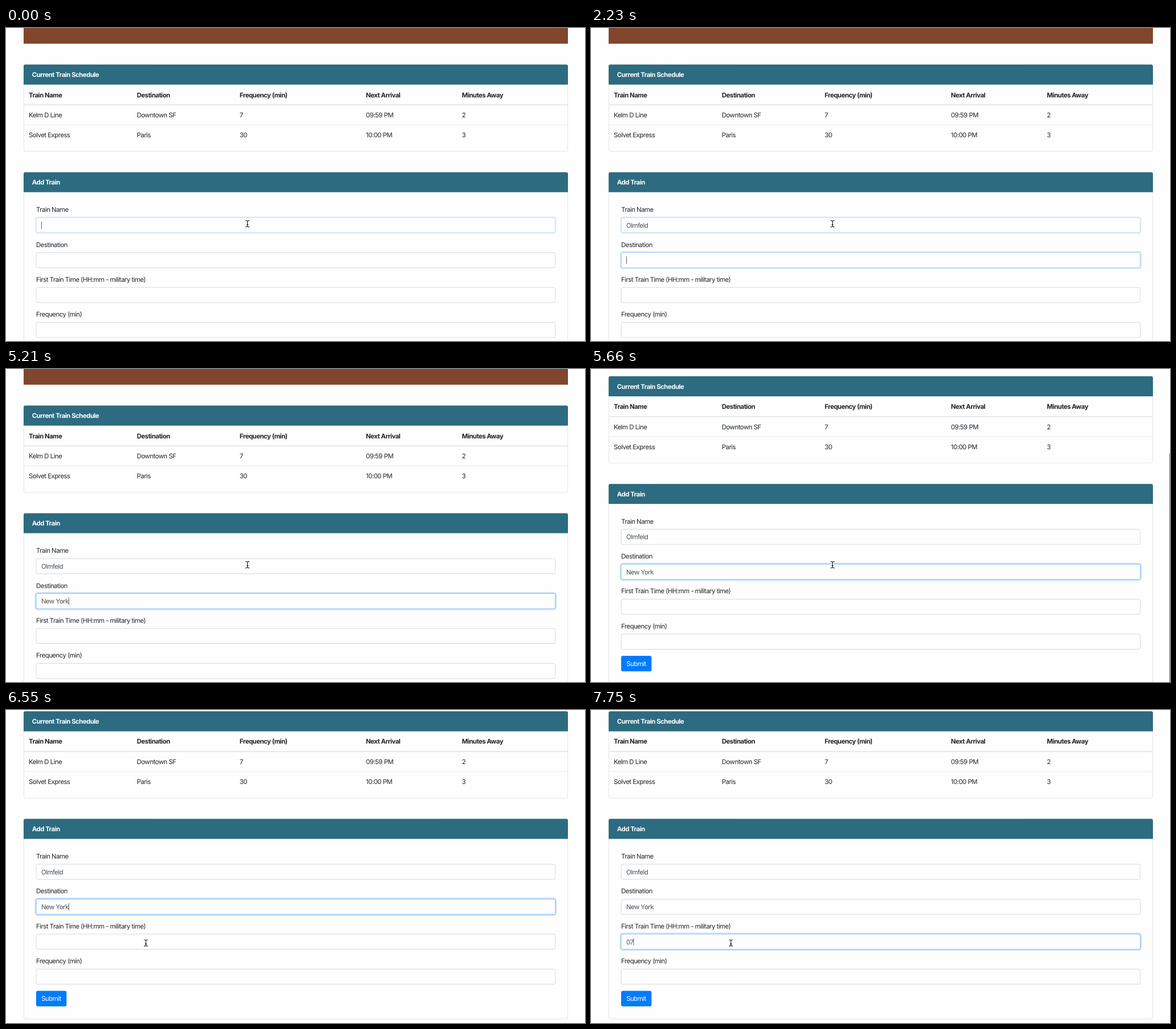
An HTML page that plays this animation: 1018 by 550 pixels, repeating every 8000 ms.

```html
<!DOCTYPE html>
<html lang="en">
<head>
<meta charset="utf-8">
<title>Train schedule</title>
<style>
  html, body { margin: 0; width: 100%; height: 100%; overflow: hidden; background: #fefefe; }
  svg { display: block; width: 1018px; height: 550px; }
  text {
    font: 400 11.43px Inter, "Open Sans", sans-serif;
    letter-spacing: -.51px;
    fill: #212529;
    text-rendering: geometricPrecision;
  }
  .bold { font-weight: 700; }
  .white { fill: #fff; }
  .typed { fill: #495057; }
</style>
</head>
<body>
<svg id="stage" viewBox="0 0 1018 550"></svg>
<script>
const NS = 'http://www.w3.org/2000/svg';
const LOOP = 8000;
const stage = document.getElementById('stage');

function add(parent, tag, attrs, content) {
  const el = document.createElementNS(NS, tag);
  for (const key in attrs) el.setAttribute(key, attrs[key]);
  if (content) el.textContent = content;
  parent.appendChild(el);
  return el;
}
const set = (el, attrs) => { for (const key in attrs) el.setAttribute(key, attrs[key]); };

const page = add(stage, 'g', {});
const box = (x, y, width, height, extra) => add(page, 'rect', { x, y, width, height, ...extra });
const label = (x, y, str, cls = '') => add(page, 'text', { x, y, class: cls }, str);

function card(y, height, title) {
  box(31.35, y + .35, 956.3, height - .7,
    { rx: 2.9, fill: '#fefefe', stroke: '#000', 'stroke-opacity': .14, 'stroke-width': .75 });
  add(page, 'path', {
    d: `M31 ${y + 35.2}V${y + 2.9}q0-2.9 2.9-2.9H985.1q2.9 0 2.9 2.9V${y + 35.2}z`, fill: '#2c6b80'
  });
  label(45.8, y + 21.8, title, 'bold white');
}

// Static page
box(31, -40, 957, 67.6, { fill: '#82452d' });
card(64.3, 152.7, 'Current Train Schedule');
const columns = [40, 230, 410.8, 632.8, 801.5];
const rows = [
  ['Train Name', 'Destination', 'Frequency (min)', 'Next Arrival', 'Minutes Away'],
  ['Kelm D Line', 'Downtown SF', '7', '09:59 PM', '2'],
  ['Solvet Express', 'Paris', '30', '10:00 PM', '3']
];
rows.forEach((row, r) => row.forEach((cell, c) =>
  label(columns[c], [121.6, 157.3, 192.3][r], cell, r ? '' : 'bold')));
box(31.7, 134.4, 955.6, 1.4, { fill: '#dee2e6' });
box(31.7, 170.1, 955.6, .8, { fill: '#dee2e6' });
card(253.4, 351.8, 'Add Train');

// Form: each key is [time, number of letters shown]
const fields = [
  { name: 'Train Name', value: 'Olmfeld', on: 0, off: 2230,
    keys: [[600, 2], [1050, 3], [1340, 4], [1490, 5], [1640, 6], [1940, 7]] },
  { name: 'Destination', value: 'New\u00a0York', on: 2230, off: 6700,
    keys: [[2670, 1], [2820, 2], [2970, 3], [3420, 4], [3720, 5], [4020, 6], [4170, 7], [5210, 8]] },
  { name: 'First Train Time (HH:mm - military time)', value: '07', on: 6700, off: LOOP,
    keys: [[7450, 1], [7750, 2]] },
  { name: 'Frequency (min)', value: '', on: LOOP, off: LOOP, keys: [] }
];
fields.forEach((f, i) => {
  const y = 333.1 + i * 61.43;
  f.y = y;
  label(53, y - 10, f.name);
  f.ring = box(51.9, y - 1.2, 915, 29, { rx: 4, fill: 'none', stroke: '#007bff', 'stroke-width': 2.3 });
  f.frame = box(53.1, y, 912.6, 26.6, { rx: 2.7, fill: '#fefefe', 'stroke-width': .85 });
  f.text = label(62, y + 17.8, '', 'typed');
});
box(53, 555.6, 53.4, 27.2, { rx: 2.8, fill: '#007bff' });
label(62.2, 573.5, 'Submit', 'white');
const caret = box(62, 0, .9, 13, { fill: '#495057' });
const bar = add(stage, 'rect', { x: 1016.8, width: 1.2, height: 420, fill: '#858585' });

const pointer = add(stage, 'g', { fill: 'none', 'stroke-linecap': 'round' });
const beam = 'M-3 -5.6Q-.4 -5.6 0 -4.4Q.4 -5.6 3 -5.6M-3 5.6Q-.4 5.6 0 4.4Q.4 5.6 3 5.6M0 -4.4V4.4M-1.4 1.8H1.4';
add(pointer, 'path', { d: beam, stroke: '#fff', 'stroke-width': 2.4 });
add(pointer, 'path', { d: beam, stroke: '#111', 'stroke-width': 1.1 });

// Motion
const clamp = v => Math.max(0, Math.min(1, v));
const ease = p => p * p * (3 - 2 * p);
const mix = (a, b, p) => a + (b - a) * p;
const REST = [206, 212, 218], FOCUS = [128, 189, 255];
const caretOff = [[4620, 5210], [5660, 6110], [7150, 7450]];

function focusLevel(t, f) {
  if (t < f.on) return 0;
  if (t < f.on + 150) return f.on ? .7 : .25;
  if (t < f.off) return 1;
  return t < f.off + 150 ? .3 : 0;
}

function draw(t) {
  const step = Math.floor((t - 5655) / 149);
  const scroll = step < 0 ? 0 : 62.1 - 10.6 * Math.pow(.25, step);
  set(page, { transform: `translate(0 ${-scroll})` });

  for (const f of fields) {
    const level = focusLevel(t, f);
    const color = REST.map((c, i) => Math.round(mix(c, FOCUS[i], level)));
    set(f.frame, { stroke: `rgb(${color})` });
    set(f.ring, { 'stroke-opacity': .25 * level });
    const count = f.keys.reduce((n, [at, len]) => t >= at ? len : n, 0);
    const shown = f.value.slice(0, count);
    if (f.text.textContent !== shown) f.text.textContent = shown;
    if (t >= f.on && t < f.off) {
      set(caret, { x: 62 + (shown ? f.text.getComputedTextLength() : 0), y: f.y + 7 });
    }
  }
  set(caret, { opacity: caretOff.some(([a, b]) => t >= a && t < b) ? 0 : 1 });

  set(bar, { y: 148 + (scroll - 51.5) * .7, opacity: step < 0 ? 0 : clamp((5 - step) / 2) });
  const p = ease(clamp((step - 2) / 4));
  set(pointer, { transform: `translate(${mix(424.6, 246, p)} ${mix(344, 409.3, p)})` });
}

const start = performance.now();
function tick() {
  draw((performance.now() - start) % LOOP);
  requestAnimationFrame(tick);
}
tick();
</script>
</body>
</html>
```
